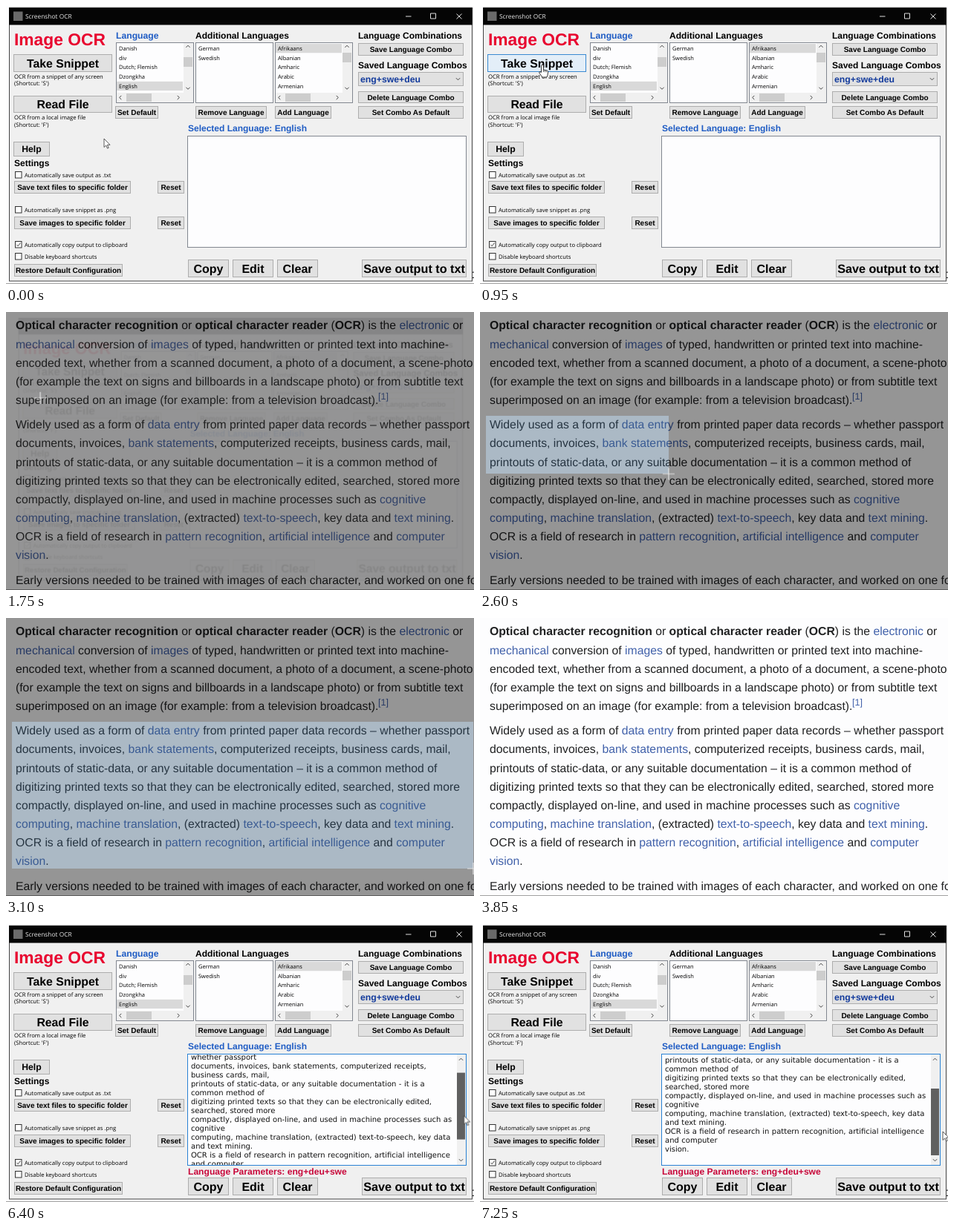
Write an HTML page that moves like this. It is 630 by 375 pixels and loops after 7300 ms.

```html
<!DOCTYPE html>
<html lang="en">
<head>
<meta charset="utf-8">
<title>Screenshot OCR</title>
<style>
html, body { margin: 0; width: 100%; height: 100%; overflow: hidden; background: #fdfdfe; }
#stage { position: relative; width: 630px; height: 375px; overflow: hidden; background: #fdfdfe; }
svg { position: absolute; left: 0; top: 0; }
text { white-space: pre; text-rendering: geometricPrecision; fill: #000; }
.page text { font: 15.76px "Liberation Sans", Arial, sans-serif; fill: #202122; }
.page .link { fill: #4161aa; }
.page .note { font-size: 12.6px; }
.bold, .page .strong { font-weight: bold; }
.bold { font-family: "Liberation Sans", Arial, sans-serif; }
.small { font-family: "Open Sans", "Noto Sans", sans-serif; }
.result text { font: 10px "DejaVu Sans", Verdana, sans-serif; word-spacing: .03em; fill: #111; }
.btn { fill: #e1e1e1; stroke: #adadad; }
.field { fill: #fdfdfe; stroke: #828790; }
.line { fill: none; stroke: #444; }

.win, .out, .box, .scroll, .thumb, .snip, .read, .sel, .cursor, .arrow, .hand, .cross {
  animation: 7.3s linear infinite;
}
.win { transform-origin: 312px 142px; animation-name: win; }
@keyframes win {
  0%, 21.23% { opacity: 1; transform: none; }
  24.3% { opacity: 0; transform: scale(.955); }
  63% { opacity: 0; transform: scale(.94); }
  66.44%, 100% { opacity: 1; transform: none; }
}
.out { animation-name: out; animation-timing-function: step-end; }
@keyframes out { 0% { opacity: 0; } 62%, 100% { opacity: 1; } }
.box { animation-name: box; animation-timing-function: step-end; }
@keyframes box { 0% { stroke: #828790; } 80.1%, 100% { stroke: #2a82d4; } }
.scroll { animation-name: scroll; }
@keyframes scroll {
  0%, 82.9% { transform: none; animation-timing-function: ease-in-out; }
  94.5%, 100% { transform: translateY(-50px); }
}
.thumb { animation-name: thumb, grip; animation-timing-function: linear, step-end; }
@keyframes thumb {
  0%, 82.9% { transform: none; animation-timing-function: ease-in-out; }
  94.5%, 100% { transform: translateY(33px); }
}
@keyframes grip { 0% { fill: #cdcdcd; } 81% { fill: #a6a6a6; } 82.2%, 100% { fill: #606060; } }
.snip { animation-name: snip; animation-timing-function: step-end; }
@keyframes snip {
  0% { fill: #e1e1e1; stroke: #adadad; }
  8.36% { fill: #e3eef8; stroke: #3a8ad2; }
  22.6%, 100% { fill: #e1e1e1; stroke: #adadad; }
}
.read { animation-name: read; animation-timing-function: step-end; }
@keyframes read {
  0% { fill: #e1e1e1; stroke: #adadad; }
  4.73% { fill: #e3eef8; stroke: #3a8ad2; }
  6.03%, 100% { fill: #e1e1e1; stroke: #adadad; }
}

/* dimmed screen with the selected area cut out */
.sel {
  position: absolute; left: 8px; top: 140px; width: 0; height: 0;
  background: rgba(48, 84, 112, .4); box-shadow: 0 0 0 900px rgba(0, 0, 0, .41);
  animation-name: drag, dim; animation-timing-function: linear, step-end;
}
@keyframes drag {
  0%, 30.8% { width: 0; height: 0; animation-timing-function: ease-in-out; }
  41.8%, 100% { width: 621px; height: 198px; }
}
@keyframes dim { 0% { opacity: 0; } 22.6% { opacity: 1; } 52.7%, 100% { opacity: 0; } }

.cursor { animation-name: move; }
@keyframes move {
  0%, .7% { transform: translate(132px, 179px); animation-timing-function: ease-in-out; }
  10.3%, 21.2% { transform: translate(84px, 80px); }
  24% { transform: translate(46px, 116px); animation-timing-function: ease-out; }
  28.8%, 30.8% { transform: translate(8px, 140px); animation-timing-function: ease-in-out; }
  41.8%, 52.7% { transform: translate(629px, 338px); }
  52.8%, 71.9% { transform: translate(634px, 332px); animation-timing-function: ease-in-out; }
  81.5%, 82.9% { transform: translate(613px, 247px); animation-timing-function: ease-in-out; }
  94.5%, 100% { transform: translate(623px, 280px); }
}
.arrow { animation-name: arrow; animation-timing-function: step-end; }
.hand { animation-name: hand; animation-timing-function: step-end; }
.cross { animation-name: cross; animation-timing-function: step-end; }
@keyframes arrow {
  0% { opacity: 1; } 4.73% { opacity: 0; } 6.03% { opacity: 1; }
  8.36% { opacity: 0; } 71.9%, 100% { opacity: 1; }
}
@keyframes hand {
  0% { opacity: 0; } 4.73% { opacity: 1; } 6.03% { opacity: 0; }
  8.36% { opacity: 1; } 22.6%, 100% { opacity: 0; }
}
@keyframes cross { 0% { opacity: 0; } 22.6% { opacity: 1; } 52.7%, 100% { opacity: 0; } }
</style>
</head>
<body>
<div id="stage">
  <svg id="screen" width="630" height="375" viewBox="0 0 630 375"></svg>
  <div class="sel"></div>
  <svg width="630" height="375" viewBox="0 0 630 375">
    <g class="cursor">
      <g class="arrow"><path d="M0 0V11.5l2.7-2.5 1.8 4.1 1.7-.8-1.8-4H8z" fill="#fff" stroke="#333" stroke-width=".8"/></g>
      <g class="hand">
        <path d="M-1.5 9.5V.8a1.5 1.5 0 0 1 3 0V6l4.8 1.1q1.5.4 1.3 2l-.7 4.2-.9 2.7H-.2l-3.9-5.6q-.5-2 1.1-1.7z" fill="#fff" stroke="#222" stroke-width=".9"/>
        <path d="M1.5 6v3M3.4 6.6v2.6M5.4 7.2v2.2" stroke="#222" stroke-width=".7"/>
      </g>
      <g class="cross"><path d="M-8 0H8M0-8V8" stroke="#e4e4e4" stroke-width="1.2"/></g>
    </g>
  </svg>
</div>
<script>
const rect = (x, y, w, h, attrs) => `<rect x="${x}" y="${y}" width="${w}" height="${h}" ${attrs}/>`;
const label = (x, y, size, s, attrs = '') => `<text x="${x}" y="${y}" font-size="${size}" ${attrs}>${s}</text>`;
const bold = (x, y, size, s, fill = '#000') => label(x, y, size, s, `class="bold" style="fill:${fill}"`);
const small = (x, y, s, size = 7.7) => label(x, y, size, s, 'class="small"');

// x1..y2 are the outer edges of the button
const button = (x1, y1, x2, y2, s, size = 10, cls = '') =>
  rect(x1 + .5, y1 + .5, x2 - x1 - 1, y2 - y1 - 1, `class="btn ${cls}"`) +
  label((x1 + x2) / 2, (y1 + y2) / 2 + size * .35, size, s, 'class="bold" text-anchor="middle"');

const chevron = (x, y, turn) =>
  `<path class="line" d="M-2.6 1.3L0-1.3 2.6 1.3" transform="translate(${x} ${y}) rotate(${turn})"/>`;

const check = (y, s, on) =>
  rect(12.5, y - 4.5, 8.5, 8.5, 'fill="#fff" stroke="#333"') +
  (on ? `<path class="line" d="M14.3 ${y - .2}l1.9 2 3.2-4.2"/>` : '') +
  small(25, y + 3, s);

function list(x, items, picked, thumb) {
  let s = rect(x + .5, 49.5, 104, 81, 'class="field"');
  if (picked >= 0) s += rect(x + 1, 51 + picked * 12.7, 89, 12.3, 'fill="#d9d9d9"');
  items.forEach((t, i) => s += small(x + 4, 59.8 + i * 12.7, t, 7.5));
  if (!thumb) return s;
  return s + rect(x + 91, 50, 13, 80, 'fill="#f0f0f0"') + rect(x + 1, 117, 103, 13, 'fill="#f0f0f0"') +
    rect(x + 91, thumb, 12, 13, 'fill="#cdcdcd"') + rect(x + 14, 118, 34, 11, 'fill="#cdcdcd"') +
    chevron(x + 97, 54.5, 0) + chevron(x + 97, 111, 180) +
    chevron(x + 6, 123.5, -90) + chevron(x + 84, 123.5, 90);
}

// {link} and *strong* inside running text
const rich = s => s
  .replace(/\{(.*?)\}/g, '<tspan class="link">$1</tspan>')
  .replace(/\*(.*?)\*/g, '<tspan class="strong">$1</tspan>');
const para = (y, lines) => lines.map((s, i) => `<text x="13" y="${y + i * 25.15}">${rich(s)}</text>`).join('');

const page = para(23.4, [
  '*Optical character recognition* or *optical character reader* (*OCR*) is the {electronic} or',
  '{mechanical} conversion of {images} of typed, handwritten or printed text into machine-',
  'encoded text, whether from a scanned document, a photo of a document, a scene-photo',
  '(for example the text on signs and billboards in a landscape photo) or from subtitle text',
  'superimposed on an image (for example: from a television broadcast).'
]) + '<text x="501" y="118.4" class="note"><tspan class="link">[1]</tspan></text>' + para(157.3, [
  'Widely used as a form of {data entry} from printed paper data records – whether passport',
  'documents, invoices, {bank statements}, computerized receipts, business cards, mail,',
  'printouts of static-data, or any suitable documentation – it is a common method of',
  'digitizing printed texts so that they can be electronically edited, searched, stored more',
  'compactly, displayed on-line, and used in machine processes such as {cognitive}',
  '{computing}, {machine translation}, (extracted) {text-to-speech}, key data and {text mining}.',
  'OCR is a field of research in {pattern recognition}, {artificial intelligence} and {computer}',
  '{vision}.'
]) + para(366.8, ['Early versions needed to be trained with images of each character, and worked on one font']) +
  rect(0, 374, 630, 1, 'fill="#a0a0a0"');

const result = [
  'Widely used as a form of data entry from printed paper data records —',
  'whether passport',
  'documents, invoices, bank statements, computerized receipts,',
  'business cards, mail,',
  'printouts of static-data, or any suitable documentation - it is a',
  'common method of',
  'digitizing printed texts so that they can be electronically edited,',
  'searched, stored more',
  'compactly, displayed on-line, and used in machine processes such as',
  'cognitive',
  'computing, machine translation, (extracted) text-to-speech, key data',
  'and text mining.',
  'OCR is a field of research in pattern recognition, artificial intelligence',
  'and computer',
  'vision.'
].map((s, i) => `<text x="249" y="${188.8 + i * 12}">${s}</text>`).join('');

const blue = '#1f5cc4';
const titleBar = rect(4, 2, 624, 23.5, 'fill="#050505"') +
  rect(10, 7.5, 12.5, 12.5, 'fill="#6a6a6a"') +
  label(26, 17, 8.4, 'Screenshot OCR', 'class="small" style="fill:#e8e8e8"') +
  '<path d="M538 14h7.5M571.5 10h7v7h-7zM606.5 10.5l7 7m0-7l-7 7" fill="none" stroke="#ddd"/>';

const left = bold(11, 52.5, 22.8, 'Image OCR', '#e8052f') +
  button(10, 65, 143, 89, 'Take Snippet', 15.8, 'snip') +
  small(11, 97.5, 'OCR from a snippet of any screen') + small(11, 107.3, "(Shortcut: 'S')") +
  button(10, 121, 143, 144, 'Read File', 15.8, 'read') +
  small(11, 152.8, 'OCR from a local image file') + small(11, 162.5, "(Shortcut: 'F')") +
  button(10, 183, 59, 203, 'Help', 12.2) +
  bold(11, 216.3, 12, 'Settings') +
  check(228, 'Automatically save output as .txt') +
  button(11, 236, 168, 253, 'Save text files to specific folder', 9.95) + button(204, 236, 240, 253, 'Reset') +
  check(275, 'Automatically save snippet as .png') +
  button(11, 284, 168, 301, 'Save images to specific folder', 9.95) + button(204, 284, 240, 301, 'Reset') +
  check(322, 'Automatically copy output to clipboard', true) +
  check(338, 'Disable keyboard shortcuts') +
  button(11, 348, 157, 365, 'Restore Default Configuration');

const lists = bold(148, 44.3, 12.2, 'Language', blue) + bold(255, 44.3, 12.05, 'Additional Languages') +
  list(148, ['Danish', 'div', 'Dutch; Flemish', 'Dzongkha', 'English'], 4, 69) +
  list(255, ['German', 'Swedish'], -1) +
  list(362, ['Afrikaans', 'Albanian', 'Amharic', 'Arabic', 'Armenian'], 0, 63) +
  button(147, 135, 205, 152, 'Set Default') + button(255, 135, 351, 152, 'Remove Language') +
  button(362, 135, 438, 152, 'Add Language');

const combos = bold(474, 44.3, 12, 'Language Combinations') +
  button(474, 50, 616, 67, 'Save Language Combo') +
  bold(474, 84.3, 12, 'Saved Language Combos') +
  rect(474.5, 89.5, 141, 18, 'class="btn"') + bold(477, 102.6, 12.25, 'eng+swe+deu', '#123a9c') +
  chevron(608.5, 98.5, 180) +
  button(474, 115, 616, 131, 'Delete Language Combo') + button(474, 135, 616, 152, 'Set Combo As Default');

const output = bold(245, 169.3, 12, 'Selected Language: English', blue) +
  rect(244.5, 175.5, 375, 150, 'class="field box"') +
  `<g class="out"><g clip-path="url(#view)"><g class="result scroll">${result}</g></g>` +
  rect(607, 176, 12, 149, 'fill="#f0f0f0"') + rect(607, 189, 11, 90, 'class="thumb"') +
  chevron(612.5, 182.5, 0) + chevron(612.5, 318.5, 180) +
  bold(245, 337.5, 12.1, 'Language Parameters: eng+deu+swe', '#c8073a') + '</g>' +
  button(245, 342, 300, 366, 'Copy', 16) + button(305, 342, 360, 366, 'Edit', 16) +
  button(365, 342, 420, 366, 'Clear', 16) + button(479, 342, 620, 366, 'Save output to txt', 16.2);

document.getElementById('screen').innerHTML =
  `<clipPath id="view">${rect(245, 176, 362, 149, '')}</clipPath><g class="page">${page}</g>` +
  `<g class="win">${rect(4.5, 2.5, 623, 368.5, 'fill="#f0f0f0" stroke="#444"')}` +
  titleBar + left + lists + combos + output + '</g>';
</script>
</body>
</html>
```
